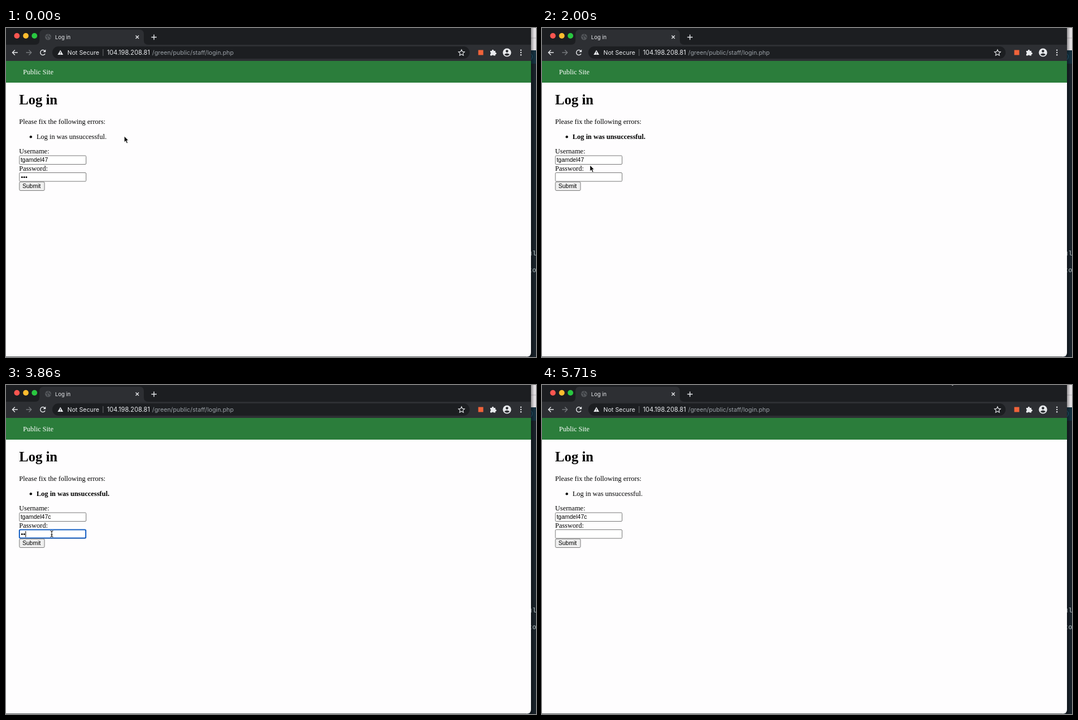
An HTML page that plays this animation: 950x590 px, repeating every 5850 ms.

```html
<!DOCTYPE html>
<html>
<head>
<meta charset="utf-8">
<title>Log in</title>
<style>
  html, body { margin: 0; height: 100%; overflow: hidden; background: #182129; }
  svg { display: block; width: 950px; height: 590px; }
  .ui { font: 10.2px Inter, sans-serif; fill: #e8eaed; }
  .page { font: 12.5px "Liberation Serif", serif; fill: #000; }
  .field { font: 10.5px "Liberation Sans", sans-serif; fill: #000; }
  .mono { font: bold 12px "Liberation Mono", monospace; fill: #8c979c; }
  .line { fill: none; stroke: #e8eaed; stroke-width: 1.4; }
  .box { fill: #fff; stroke: #767676; }
</style>
</head>
<body>
<svg viewBox="0 0 950 590">
  <defs>
    <linearGradient id="shade"><stop stop-color="#000" stop-opacity=".4"/><stop offset="1" stop-opacity="0"/></linearGradient>
    <filter id="soft" x="-10%" y="-10%" width="120%" height="130%"><feDropShadow dx="0" dy="1" stdDeviation="1.5" flood-opacity=".4"/></filter>
  </defs>

  <!-- window behind -->
  <rect width="950" height="590" fill="#182129"/>
  <rect x="930" width="20" height="40" fill="#e4e1e4"/>
  <path d="M930 18h20" stroke="#b9b6ba"/>
  <rect x="930" y="40" width="20" height="24" fill="#14303f"/>
  <path d="M941 46q5 5 0 11" fill="none" stroke="#2b6a85"/>
  <g class="mono"><text x="936" y="408">ul</text><text x="936" y="438">to</text></g>
  <rect x="940" width="7" height="590" fill="url(#shade)"/>

  <!-- browser frame -->
  <path d="M0 0H941V582q0 7.500-8 7.500H0z" fill="#fefdfe"/>
  <path d="M0 589.500H933" stroke="#55595c"/>
  <rect width="941" height="30" fill="#1c1e21"/>
  <path d="M52 30q8 0 8-8V11q0-8 8-8H239q8 0 8 8v11q0 8 8 8H941V59H0V30z" fill="#2d2f33"/>
  <rect x="83" y="33" width="748" height="22" rx="11" fill="#1c1e21"/>
  <circle cx="19.500" cy="14" r="5" fill="#fc5650"/>
  <circle cx="35.500" cy="14" r="5" fill="#fdbc2e"/>
  <circle cx="51" cy="14" r="5" fill="#29c740"/>
  <g id="globe"><circle cx="75.500" cy="16" r="5.500" fill="#55585c"/>
    <path d="M71 14l3 2 1 4M76 11l-1 3 3 1 2 3" fill="none" stroke="#34373b" stroke-width="1.500"/></g>
  <path id="spinner" d="M75.500 11a5 5 0 0 1 5 5" class="line" style="stroke:#7b7f85"/>
  <path class="line" d="M232.500 13.500l5.500 5.500m0-5.500l-5.500 5.500M260.500 16.500h9.500m-4.750-4.750v9.500"/>
  <path class="line" d="M21 44H11.500m4.500-4.500L11.500 44l4.500 4.500"/>
  <path class="line" style="stroke:#76797d" d="M36 44h9.500m-4.500-4.500l4.500 4.500-4.500 4.500"/>
  <g id="reload"><path class="line" d="M70 46.200a4.500 4.500 0 1 1-.7-5.300"/><path d="M71.200 38.500v4.800h-4.800z" fill="#e8eaed"/></g>
  <path id="stop" class="line" d="M62 40l8 8m0-8l-8 8"/>
  <path d="M97.500 39.500l5 8.500h-10z" fill="#e8eaed"/><path d="M97.500 42.500v2.500m0 1v1" stroke="#1c1e21"/>
  <path d="M174 38v12" stroke="#6a6d71"/>
  <path class="line" style="stroke-width:1.100" d="M816.500 38.800l1.600 3.600 3.900.4-2.900 2.600.8 3.800-3.400-2-3.400 2 .8-3.800-2.900-2.600 3.900-.4z"/>
  <rect x="846.500" y="39.500" width="9" height="9" fill="#f0633a"/>
  <path d="M868 41h3v-.7a1.600 1.600 0 0 1 3.200 0v.7h3v3h.4a1.600 1.600 0 0 1 0 3.200h-.4v2.300h-3.200a1.600 1.600 0 0 0-3 0h-3v-3a1.600 1.600 0 0 0 0-3z" fill="#e8eaed"/>
  <circle cx="898" cy="44" r="7.500" fill="#e8eaed"/>
  <circle cx="898" cy="41.500" r="2.300" fill="#2d2f33"/><path d="M893.200 47.500q4.800-4.200 9.600 0-4.800 4.400-9.600 0" fill="#2d2f33"/>
  <g fill="#e8eaed"><circle cx="923" cy="39.800" r="1.200"/><circle cx="923" cy="44" r="1.200"/><circle cx="923" cy="48.200" r="1.200"/></g>
  <g class="ui">
    <text x="88" y="19.700" style="font-size:9.600px">Log in</text>
    <text x="110" y="48" style="font-size:10.800px">Not Secure</text>
    <text x="181" y="48" style="font-size:11.200px">104.198.208.81</text>
    <text x="262" y="48" style="font-size:10.800px;fill:#9aa0a6">/green/public/staff/login.php</text>
  </g>

  <!-- page -->
  <rect y="59" width="941" height="39" fill="#2b7d3b"/>
  <g class="page">
    <text x="30.500" y="83" fill="#fff" style="fill:#fff">Public Site</text>
    <text x="23.500" y="137" style="font-size:25px;font-weight:bold">Log in</text>
    <text x="23.500" y="172">Please fix the following errors:</text>
    <circle cx="44.500" cy="195.300" r="2.200"/>
    <text id="error" x="54.700" y="199">Log in was unsuccessful.</text>
    <text x="23.500" y="225">Username:</text>
    <text x="23.500" y="256">Password:</text>
  </g>
  <rect class="box" x="24" y="229" width="119.500" height="15.500" rx="1.500"/>
  <rect class="box" x="24" y="259.500" width="119.500" height="15.500" rx="1.500"/>
  <rect id="ring" x="24" y="229" width="119" height="15" rx="2" fill="none" stroke="#1660c4" stroke-width="2"/>
  <rect id="button" class="box" x="24" y="276" width="45" height="15.500" rx="2"/>
  <g class="field">
    <text id="user" x="26.200" y="240"></text>
    <text x="29.500" y="287.200">Submit</text>
  </g>
  <g id="dots"><circle cx="28.700" cy="267.500" r="1.500"/><circle cx="32.600" cy="267.500" r="1.500"/><circle cx="36.500" cy="267.500" r="1.500"/></g>
  <path id="caret" d="M0 0v11" stroke="#000"/>

  <g id="menu" class="ui">
    <rect x="23.500" y="246" width="150.500" height="101" rx="2.500" fill="#202124" filter="url(#soft)"/>
    <rect id="hover" x="23.500" y="281" width="150.500" height="28" fill="#3c4043"/>
    <path d="M23.500 315.500H174" stroke="#36383c"/>
    <text x="33" y="270" font-weight="500" style="font-weight:500">tgamdel47</text>
    <text x="33" y="298.500" style="font-weight:500">tgamdel47c</text>
    <text x="33" y="335" style="font-size:10px">Hide suggestions</text>
  </g>

  <g id="status" class="ui">
    <path d="M0 573H308q3.500 0 3.500 3.500V590H0z" fill="#2d2f33" filter="url(#soft)"/>
    <text x="2.500" y="584.500" style="font-size:9.400px;fill:#c3c6ca">Waiting for 104.198.208.81...</text>
  </g>

  <path id="arrow" d="M0 0V10.800L2.500 8.500 4.300 12.800 6.300 12 4.500 7.800H7.600z" fill="#000" stroke="#fff" stroke-width=".8"/>
  <path id="beam" d="M-2.500-5.500q2.500 0 2.500 2V3.500q0 2-2.500 2M2.500-5.500q-2.500 0-2.500 2M0 3.500q0 2 2.500 2M-1.500 1.500h3" fill="none" stroke="#000"/>
</svg>

<script>
const LOOP = 5850, FPS = 7;
const el = id => document.getElementById(id);
const show = (id, on) => el(id).setAttribute('visibility', on ? 'visible' : 'hidden');
const move = (id, x, y) => el(id).setAttribute('transform', `translate(${x} ${y})`);

// pointer keys: step, x, y
const pointer = [
  [0, 212, 194], [1, 192, 211], [4, 55, 284], [7, 48, 287], [8, 45, 291], [12, 45, 291],
  [14, 86, 246], [16, 110, 238], [20, 111, 237], [22, 72, 293], [23, 85, 265],
  [27, 82, 267], [30, 53, 285], [35, 53, 285], [36, 58, 283],
  [37, 120, 240], [38, 290, 155], [39, 520, 65], [40, 731, -12]
];

function pointerAt(step) {
  const i = Math.max(1, pointer.findIndex(p => p[0] >= step));
  const [a, x0, y0] = pointer[i - 1], [b, x1, y1] = pointer[i];
  const u = (step - a) / (b - a);
  return [x0 + (x1 - x0) * u, y0 + (y1 - y0) * u];
}

function draw(time) {
  const step = Math.floor((time + 6) * FPS / 1000);
  const within = (a, b) => step >= a && step <= b;
  const [x, y] = pointerAt(step);

  const menu = within(18, 22);
  const loading = within(5, 9) || within(31, 34);
  const spinning = loading && step !== 31;
  const pressed = within(5, 6) || within(30, 32);
  const userFocus = within(17, 23), passFocus = within(24, 29);

  show('globe', !loading);
  show('spinner', spinning);
  el('spinner').setAttribute('transform', `rotate(${-step * 70} 75.5 16)`);
  show('reload', !loading);
  show('stop', loading);
  show('status', within(7, 12) || within(33, 36));

  el('error').style.fontWeight = within(10, 34) ? 'bold' : 'normal';
  el('user').textContent = step < 23 ? 'tgamdel47' : 'tgamdel47c';
  el('button').style.fill = pressed ? '#d4d4d4' : loading ? '#e5e5e5' : '#efefef';

  const typed = step < 10 ? 3 : within(26, 34) ? Math.min(3, step - 25) : 0;
  [...el('dots').children].forEach((dot, i) =>
    dot.setAttribute('visibility', i < typed ? 'visible' : 'hidden'));

  show('ring', userFocus || passFocus);
  move('ring', 0, passFocus ? 30.5 : 0);
  show('caret', step === 17 || step === 23 || passFocus);
  if (passFocus) move('caret', 27.5 + typed * 3.9, 262);
  else move('caret', 26.7 + el('user').getComputedTextLength(), 231.5);

  show('menu', menu);
  show('hover', step === 22);

  const overField = x > 24 && x < 143 &&
    (y > 229 && y < 245 || !menu && y > 259 && y < 275);
  show('arrow', !overField);
  show('beam', overField);
  move('arrow', x, y);
  move('beam', x, y);
}

function tick() {
  draw(performance.now() % LOOP);
  requestAnimationFrame(tick);
}
tick();
</script>
</body>
</html>
```
